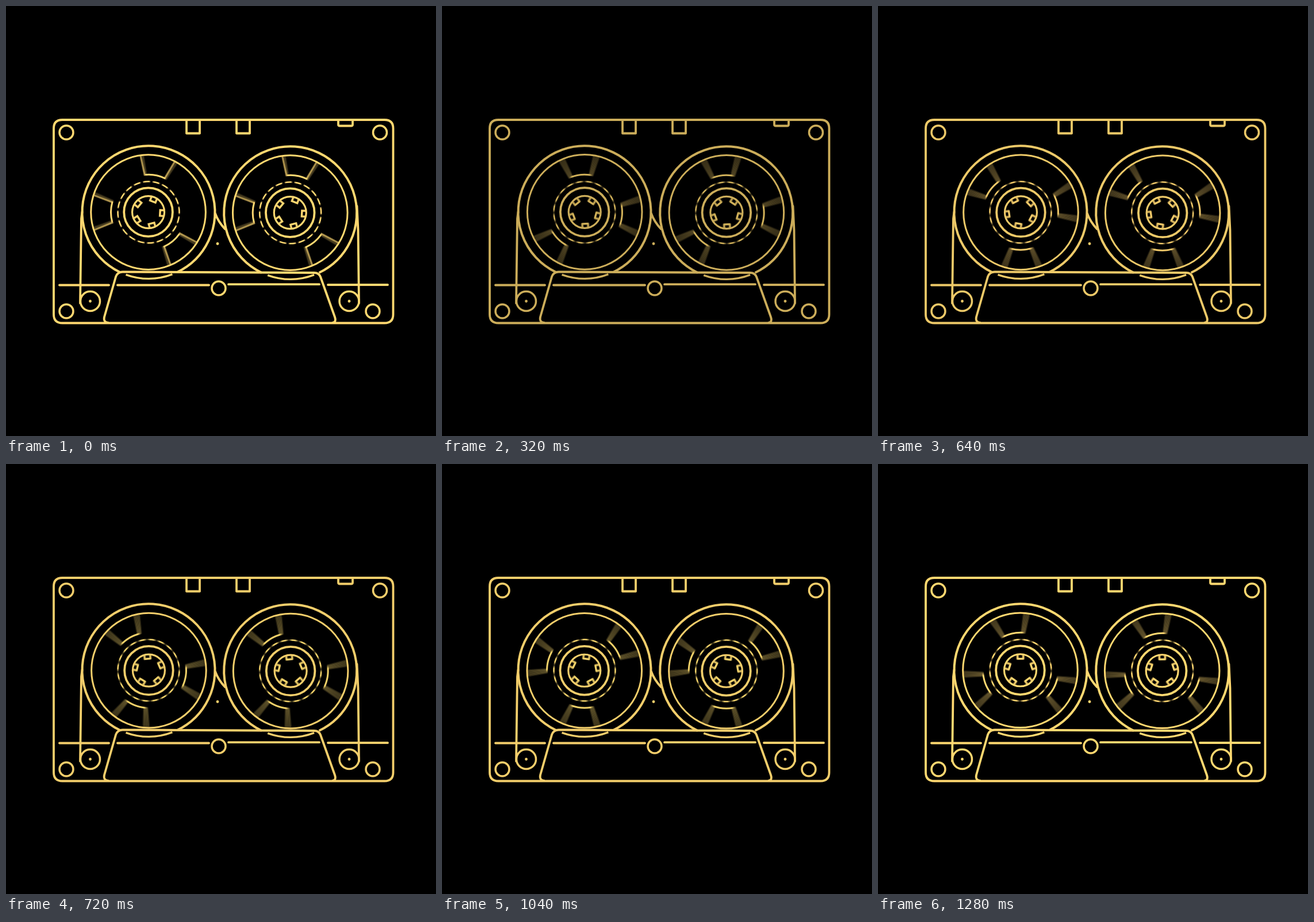
Animation, 748 px wide and 748 px high, one loop 1360 ms. Source, as an HTML page with a canvas:

```html
<!DOCTYPE html>
<html lang="en">
<head>
<meta charset="utf-8">
<title>Cassette</title>
<style>
  html, body { margin: 0; height: 100%; overflow: hidden; background: #000; }
  canvas { display: block; }
</style>
</head>
<body>
<canvas id="stage" width="748" height="748"></canvas>
<script>
const ctx = document.getElementById('stage').getContext('2d');
const STEP = 80, STEPS = 17, TURN = 360 / STEPS;
const BLUR = 6, SAMPLES = 8;
const RAD = Math.PI / 180;
const reels = [[248, 358.8, 463], [494.7, 359.8, 464]];
// [step, brightness]
const glow = [[0, 1], [2, 1], [4, 0.8], [8, 0.93], [11, 1], [14, 0.93], [16, 1]];

const shell = new Path2D(`
  M98 198H658.5Q673.5 198 673.5 213V536.5Q673.5 551.5 658.5 551.5H98Q83 551.5 83 536.5V213Q83 198 98 198Z
  M314 199V221.5H337V199 M401 199V221.5H424V199 M578 199V206Q578 208.5 580 208.5H601Q603 208.5 603 206V199
  M178 551Q169 550 171 541L191 471Q194 462.5 203 462.5L536 464Q544 464 547 471L572 541Q575 550 568 551
  M93 485.5H179 M194 485.5H353 M387 484.2H545 M560 485H664
  M132.5 358L131 370L129 517 M610.5 348L612.5 390L614 517 M364 361Q369 375 381 388`);
const screws = [[105, 220, 12], [650.5, 220, 12], [105, 531, 12], [638, 531, 12],
  [370, 491, 12], [146.5, 513.5, 17], [597, 513.5, 17]];
const dots = [[146.5, 513.5], [597, 513.5], [368, 413.5]];

const polar = (r, deg) => [r * Math.sin(deg * RAD), -r * Math.cos(deg * RAD)];

const spokes = new Path2D();
for (const mid of [0, 130, -130]) {
  spokes.moveTo(...polar(99, mid - 17.7));
  spokes.lineTo(...polar(65.5, mid - 15.7));
  spokes.arc(0, 0, 65.5, (mid - 105.7) * RAD, (mid - 74.3) * RAD);
  spokes.lineTo(...polar(99, mid + 17.7));
}

const teeth = new Path2D();
for (let i = 0; i < 5; i++) {
  const tooth = new Path2D('M-5 -27V-20H5V-27');
  teeth.addPath(tooth, new DOMMatrix().rotate(25 + 72 * i));
}

const dashes = new Path2D();
for (let i = 0; i < 20; i++) {
  dashes.moveTo(...polar(53.5, i * 18 - 6.3));
  dashes.arc(0, 0, 53.5, (i * 18 - 96.3) * RAD, (i * 18 - 83.7) * RAD);
}

function circle(x, y, r, width, from = 0, to = 2 * Math.PI) {
  ctx.lineWidth = width;
  ctx.beginPath();
  ctx.arc(x, y, r, from, to);
  ctx.stroke();
}

function strokePath(path, width) {
  ctx.lineWidth = width;
  ctx.stroke(path);
}

function brightness(step) {
  const i = glow.findIndex(([s]) => s >= step);
  if (i < 1) return glow[0][1];
  const [s0, b0] = glow[i - 1], [s1, b1] = glow[i];
  return b0 + (b1 - b0) * (step - s0) / (s1 - s0);
}

function drawReel([x, y, edge], turn) {
  // Average several poses for motion blur; the wheel is at rest before the loop begins
  ctx.lineCap = 'butt';
  ctx.globalCompositeOperation = 'lighter';
  ctx.globalAlpha = 1 / SAMPLES;
  for (let i = 0; i < SAMPLES; i++) {
    const angle = Math.max(0, turn + BLUR * (i / (SAMPLES - 1) - 0.5));
    ctx.save();
    ctx.translate(x, y);
    ctx.rotate((139.5 + angle) * RAD);
    strokePath(spokes, 3);
    strokePath(dashes, 2.6);
    strokePath(teeth, 3.4);
    ctx.restore();
  }
  ctx.globalCompositeOperation = 'source-over';
  ctx.globalAlpha = 1;

  // Rings sit slightly off the axle
  const [dx, dy] = polar(0.5, turn - 65);
  circle(x + dx, y + dy, 99.8, 3);
  circle(x + dx, y + dy, 42.3, 3.8);
  circle(x + dx, y + dy, 28, 3.2);

  const r = 115.5, cut = Math.asin((edge - y) / r);
  circle(x, y, r, 4, Math.PI - cut, 2 * Math.PI + cut);
  circle(x, y, r, 3.5, 69 * RAD, 110 * RAD);
}

function draw(now) {
  const step = Math.floor(now / STEP) % STEPS;
  const b = brightness(step);
  ctx.fillStyle = '#000';
  ctx.fillRect(0, 0, 748, 748);
  ctx.strokeStyle = ctx.fillStyle = `rgb(${[255, 216, 112].map(c => Math.round(c * b))})`;

  for (const reel of reels) drawReel(reel, step * TURN);

  ctx.lineCap = ctx.lineJoin = 'round';
  strokePath(shell, 3.8);
  for (const [x, y, r] of screws) circle(x, y, r, 3.5);
  for (const [x, y] of dots) {
    ctx.beginPath();
    ctx.arc(x, y, 2.4, 0, 2 * Math.PI);
    ctx.fill();
  }
  requestAnimationFrame(draw);
}
requestAnimationFrame(draw);
</script>
</body>
</html>
```
